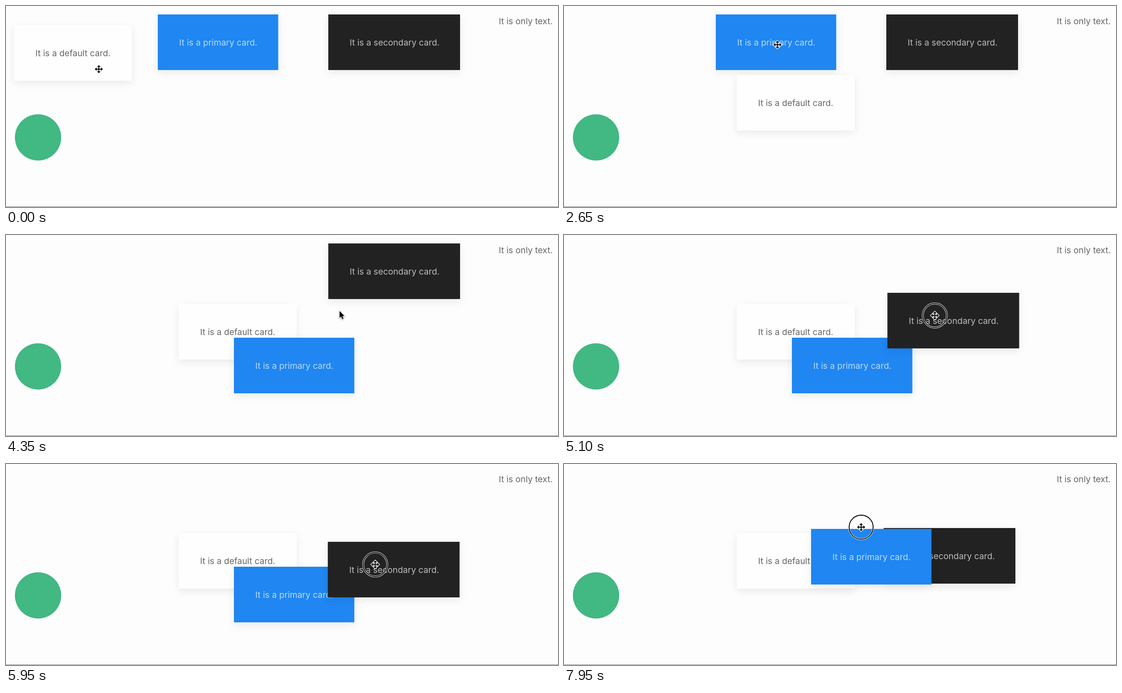
An HTML page with a canvas for the animation above (8000 ms loop, 1240 by 452 pixels).

```html
<!DOCTYPE html>
<html lang="en">
<head>
<meta charset="utf-8">
<title>Draggable cards</title>
<style>
html, body { margin: 0; width: 100%; height: 100%; overflow: hidden; background: #fdfdfd; }
canvas { display: block; }
</style>
</head>
<body>
<canvas id="stage" width="1240" height="452"></canvas>
<script>
const ctx = document.getElementById('stage').getContext('2d');
const LOOP = 8000, STEP = 50, CARD_H = 125;

const cards = {
  secondary: { x: 724, y: 19, w: 296, fill: '#222', ink: 'rgba(255,255,255,.7)' },
  primary: { x: 341, y: 19, w: 270.5, fill: '#1f86f2', ink: 'rgba(255,255,255,.7)' },
  default: { x: 18, y: 43, w: 265, fill: '#fefefe', ink: '#666' }
};

// Pointer stops: time, x, y
const path = [
  [0, 208, 142], [450, 189, 109], [600, 189, 109],
  [1200, 449, 185], [1400, 545, 226], [1600, 559, 221], [1850, 559, 221],
  [2650, 479, 87], [2750, 479, 87],
  [3150, 608, 258], [3500, 650, 299], [3800, 650, 299],
  [4350, 749, 171], [4750, 830, 70], [4900, 830, 70],
  [5300, 836, 292], [5550, 838, 289], [5700, 837, 280], [6150, 824, 195], [6350, 824, 195],
  [6700, 591, 206], [7200, 624, 227], [7400, 624, 227], [7950, 667, 142], [8000, 667, 142]
];

// Card, press time, release time
const drags = [
  ['default', 500, 1750],
  ['primary', 2700, 3650],
  ['secondary', 4800, 6250],
  ['primary', 7300, 8000]
];

// Monotone cubic through the stops, on axis 1 (x) or 2 (y)
function along(t, axis) {
  const slope = k => path[k] && path[k + 1]
    ? (path[k + 1][axis] - path[k][axis]) / (path[k + 1][0] - path[k][0]) : 0;
  const tangent = k => {
    const a = slope(k - 1), b = slope(k);
    return a * b > 0 ? 2 * a * b / (a + b) : 0;
  };
  let i = 0;
  while (i < path.length - 2 && t >= path[i + 1][0]) i++;
  const h = path[i + 1][0] - path[i][0], u = (t - path[i][0]) / h, v = 1 - u;
  return path[i][axis] * v * v * (1 + 2 * u) + path[i + 1][axis] * u * u * (3 - 2 * u)
    + h * u * v * (v * tangent(i) - u * tangent(i + 1));
}

const pointer = t => ({ x: along(t, 1), y: along(t, 2) });

function layout(t) {
  const pos = {};
  for (const name in cards) pos[name] = { x: cards[name].x, y: cards[name].y };
  let order = Object.keys(cards), pressed = false;
  for (const [name, from, to] of drags) {
    if (t < from) break;
    const a = pointer(from), b = pointer(Math.min(t, to));
    pos[name].x += b.x - a.x;
    pos[name].y += b.y - a.y;
    order = [...order.filter(n => n !== name), name];
    pressed = t < to;
  }
  return { pos, order, pressed };
}

function shadow(color, blur, dy) {
  ctx.shadowColor = color;
  ctx.shadowBlur = blur;
  ctx.shadowOffsetY = dy;
}

function drawCard(name, { x, y }) {
  const { w, fill, ink } = cards[name];
  ctx.fillStyle = fill;
  shadow('rgba(0,0,0,.08)', 18, 6);
  ctx.fillRect(x, y, w, CARD_H);
  shadow('transparent', 0, 0);
  ctx.fillStyle = ink;
  ctx.fillText(`It is a ${name} card.`, x + 48, y + 70);
}

function polygon(points) {
  points.forEach(([x, y], i) => i ? ctx.lineTo(x, y) : ctx.moveTo(x, y));
  ctx.closePath();
}

function outlined(width) {
  ctx.strokeStyle = '#fff';
  ctx.lineWidth = width;
  ctx.stroke();
  ctx.fillStyle = '#000';
  ctx.fill();
}

function moveCursor() {
  const arm = [[1, 0], [1, -5], [4, -5], [0, -9], [-4, -5], [-1, -5], [-1, 0]];
  ctx.beginPath();
  for (let i = 0; i < 4; i++) {
    polygon(arm);
    ctx.rotate(Math.PI / 2);
  }
  outlined(2.6);
}

function arrowCursor() {
  ctx.beginPath();
  polygon([[0, 0], [0, 15], [3.4, 11.8], [6, 18], [8.4, 17], [5.8, 11], [10.5, 11]]);
  shadow('rgba(0,0,0,.35)', 3, 1);
  outlined(2);
  shadow('transparent', 0, 0);
}

function ring() {
  ctx.beginPath();
  ctx.arc(0, 0, 27, 0, 7);
  for (const [color, width] of [['#fff', 3.8], ['#000', 2]]) {
    ctx.strokeStyle = color;
    ctx.lineWidth = width;
    ctx.stroke();
  }
}

function draw(t) {
  const { pos, order, pressed } = layout(t), p = pointer(t);
  ctx.fillStyle = '#fdfdfd';
  ctx.fillRect(0, 0, 1240, 452);
  ctx.fillStyle = '#777';
  ctx.fillRect(0, 451, 1240, 1);

  ctx.fillStyle = '#42b883';
  ctx.beginPath();
  ctx.arc(72, 295.5, 52, 0, 7);
  ctx.fill();

  ctx.font = '19.3px Inter, "Open Sans", sans-serif';
  ctx.fillStyle = '#666';
  ctx.fillText('It is only text.', 1107, 41);
  for (const name of order) drawCard(name, pos[name]);

  const hover = order.some(n => p.x >= pos[n].x && p.x <= pos[n].x + cards[n].w
    && p.y >= pos[n].y && p.y <= pos[n].y + CARD_H);
  ctx.save();
  ctx.translate(p.x + .5, p.y);
  if (pressed) ring();
  if (pressed || hover) moveCursor(); else arrowCursor();
  ctx.restore();
}

function tick() {
  const t = performance.now() % LOOP;
  draw(t - t % STEP);
  requestAnimationFrame(tick);
}
tick();
</script>
</body>
</html>
```
